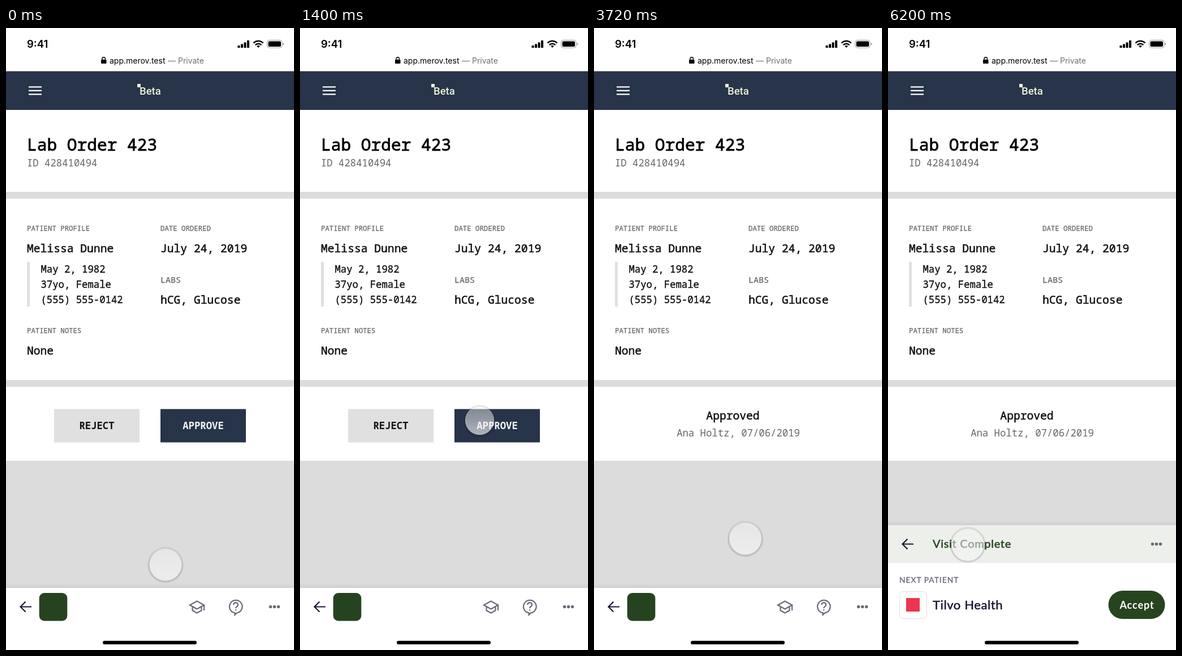
An HTML page for the animation above (6.24 s loop, 509x1101 px).

```html
<!DOCTYPE html>
<html lang="en">
<head>
<meta charset="utf-8">
<title>Lab order approval</title>
<style>
  html, body { margin: 0; width: 100%; height: 100%; overflow: hidden; background: #fff; }
  svg { display: block; width: 100vw; height: 100vh; }
  /* Thin strokes give the regular cuts a medium weight. */
  .mono { font-family: "Noto Sans Mono", "DejaVu Sans Mono", monospace; font-size: 17.3px; fill: #111; stroke: #111; stroke-width: .4; }
  .title { font-size: 29.5px; fill: #000; stroke: #000; stroke-width: .8; }
  .value { font-size: 19.65px; stroke-width: .55; }
  .label { font-size: 12.35px; fill: #666; stroke: #666; stroke-width: .25; }
  .soft { fill: #666; stroke: none; }
  .bold { font-weight: 700; stroke: none; }
  .mid { text-anchor: middle; }
  .ui { font-family: Inter, Roboto, sans-serif; font-size: 14px; }
  .app { font-family: Lato, "Open Sans", sans-serif; font-weight: 400; stroke-width: .55; }
  .line { fill: none; stroke-width: 2.2; }
</style>
</head>
<body>
<svg viewBox="0 0 509 1101" preserveAspectRatio="none">
  <defs>
    <clipPath id="view"><rect y="145" width="509" height="956"/></clipPath>
    <linearGradient id="glass" x2="0" y2="1">
      <stop stop-color="#f4f4f4" stop-opacity=".42"/>
      <stop offset="1" stop-color="#f4f4f4" stop-opacity=".66"/>
    </linearGradient>
    <linearGradient id="edge" x2="0" y2="1">
      <stop stop-opacity="0"/>
      <stop offset="1" stop-opacity=".06"/>
    </linearGradient>
    <radialGradient id="halo">
      <stop offset=".86" stop-opacity="0"/>
      <stop offset=".89" stop-opacity=".18"/>
      <stop offset="1" stop-opacity="0"/>
    </radialGradient>
  </defs>

  <rect y="145" width="509" height="956" fill="#dcdcdc"/>
  <g clip-path="url(#view)">
    <g id="page">
      <path fill="#fff" d="M0 100H509V290H0zM0 302H509V623H0zM0 635H509V766H0z"/>
      <text class="mono title" x="37" y="216.5">Lab Order 423</text>
      <text class="mono soft" x="37" y="245">ID 428410494</text>
      <text class="mono label" x="37" y="359">PATIENT PROFILE</text>
      <text class="mono value" x="37" y="397">Melissa Dunne</text>
      <rect x="37" y="414" width="5" height="79" fill="#e0e0e0"/>
      <text class="mono" x="61.5" y="433">May 2, 1982</text>
      <text class="mono" x="61.5" y="460">37yo, Female</text>
      <text class="mono" x="61.5" y="487">(555) 555-0142</text>
      <text class="mono label" x="37" y="539.5">PATIENT NOTES</text>
      <text class="mono value" x="37" y="577.5">None</text>
      <text class="mono label" x="273" y="359">DATE ORDERED</text>
      <text class="mono value" x="273" y="397">July 24, 2019</text>
      <text class="mono label" x="273" y="451" style="font-size:15px">LABS</text>
      <text class="mono value" x="273" y="488">hCG, Glucose</text>
      <g id="buttons">
        <rect x="85" y="674.5" width="151" height="59" fill="#e0e0e0"/>
        <rect x="273" y="674.5" width="151" height="59" fill="#273449"/>
        <text class="mono bold mid" x="160.5" y="710">REJECT</text>
        <text id="approve" class="mono bold mid" x="348.5" y="710" style="fill:#f4f4f4">APPROVE</text>
        <g id="spinner" transform="translate(349 704)" stroke="#fff" stroke-width="2" stroke-linecap="round"></g>
      </g>
      <g id="approved">
        <text class="mono value mid" x="245.5" y="693">Approved</text>
        <text class="mono soft mid" x="255" y="722.5">Ana Holtz, 07/06/2019</text>
      </g>
    </g>
  </g>

  <rect width="509" height="77" fill="#fff"/>
  <rect y="76.5" width="509" height="68.500" fill="#273449"/>
  <path d="M40 104.3H63M40 110.8H63M40 117.3H63" stroke="#fff" stroke-width="2.2"/>
  <rect x="232" y="99" width="6" height="6" fill="#eef0d8"/>
  <text x="236" y="118" fill="#eef0d8" style="font:500 18.5px Roboto,sans-serif">Beta</text>
  <rect id="progress" y="73.5" height="3.5" fill="#4b5942"/>

  <text class="ui" x="37" y="34.5" style="font-size:18.5px;font-weight:600">9:41</text>
  <path d="M409.5 31h4v4h-4zM415 28.5h4V35h-4zM420.5 25.5h4V35h-4zM426 22h4v13h-4z"/>
  <g fill="none" stroke="#000" stroke-width="2.5">
    <path d="M437.5 26.5a12.2 12.2 0 0 1 17 0M440.7 30a7.6 7.6 0 0 1 10.6 0"/>
    <rect x="461.5" y="21.5" width="26.5" height="13.5" rx="4" stroke="#999" stroke-width="1"/>
  </g>
  <path d="M446 35l-2.8-3a4 4 0 0 1 5.6 0z"/>
  <rect x="463.5" y="23.5" width="22.5" height="9.5" rx="2.2"/>
  <path d="M489.5 26v4.5q2-.6 2-2.2t-2-2.3z" fill="#999"/>
  <rect x="168" y="56" width="9.5" height="7" rx="1"/>
  <path d="M170 56.5v-2a2.7 2.7 0 0 1 5.4 0v2" fill="none" stroke="#000" stroke-width="1.4"/>
  <text class="ui" x="183" y="62.5">app.merov.test</text>
  <text class="ui" x="286" y="62.5" fill="#707070">— Private</text>

  <g id="sheet">
    <rect y="983" width="509" height="8" fill="url(#edge)"/>
    <rect y="991" width="509" height="230" fill="#fff"/>
    <g id="done">
      <rect id="tint" y="991" width="509" fill="#ecefea"/>
      <text class="app" x="79" y="1031" fill="#274420" stroke="#274420" style="font-size:20px;letter-spacing:.7px">Visit Complete</text>
    </g>
    <g id="tools">
      <rect x="58.7" y="1000" width="49.6" height="49.5" rx="9" fill="#26431f"/>
      <g class="line" stroke="#6b6878">
        <path d="M325 1021.5L337.5 1014.5 350 1021.5 337.5 1028.5zM329.5 1025v6l8 4.5 8-4.5v-6M350 1021.5v9.5"/>
        <path d="M404.5 1035.3a11.3 11.3 0 1 1 3.5 0l-3.5 3.5z"/>
        <path d="M402.3 1021a3.8 3.8 0 1 1 5.6 3.2q-1.8 1-1.8 3M406.1 1029v2.3"/>
      </g>
    </g>
    <path class="line" stroke="#1b1533" d="M45 1024.5H26M34.5 1015.5l-9 9 9 9"/>
    <g fill="#6b6878">
      <circle cx="467.5" cy="1024.5" r="2.7"/>
      <circle cx="474.5" cy="1024.5" r="2.7"/>
      <circle cx="481.5" cy="1024.5" r="2.7"/>
    </g>
    <g id="next">
      <text class="app" x="20" y="1093" fill="#6a6678" stroke="#6a6678" style="font-size:13.8px;letter-spacing:1px;stroke-width:.3">NEXT PATIENT</text>
      <rect x="20.5" y="1108.5" width="48" height="48" rx="7" fill="#fff" stroke="#dedede"/>
      <rect x="32" y="1120" width="24" height="24" fill="#ee3550"/>
      <text class="app" x="79" y="1139.5" fill="#1b1533" stroke="#1b1533" style="font-size:22px;letter-spacing:.6px">Tilvo Health</text>
      <rect x="389.5" y="1107" width="100" height="50" rx="25" fill="#26451f"/>
      <text class="app mid" x="440" y="1138.5" fill="#fff" style="font-size:18px;font-weight:700;letter-spacing:.9px">Accept</text>
    </g>
  </g>
  <rect x="171" y="1084.8" width="166" height="6.2" rx="3.1"/>

  <g id="cursor">
    <circle cy="1.5" r="32.5" fill="url(#halo)"/>
    <circle r="28.2" fill="url(#glass)" stroke="#fff" stroke-opacity=".3"/>
  </g>
</svg>
<script>
const LOOP = 6240;
const el = id => document.getElementById(id);
const ease = p => p < .5 ? 2 * p * p : 1 - 2 * (1 - p) ** 2;

// Eased interpolation between [time, value] keys.
function track(t, ...keys) {
  if (t <= keys[0][0]) return keys[0][1];
  for (let i = 1; i < keys.length; i++) {
    const [t0, a] = keys[i - 1], [t1, b] = keys[i];
    if (t < t1) return a + (b - a) * ease((t - t0) / (t1 - t0));
  }
  return keys[keys.length - 1][1];
}

const set = (id, name, value) => el(id).setAttribute(name, value);
const fade = (id, value) => set(id, "opacity", value);

const spokes = Array.from({ length: 12 }, (_, i) => {
  const spoke = document.createElementNS("http://www.w3.org/2000/svg", "path");
  spoke.setAttribute("d", "M0 -8V-13");
  spoke.setAttribute("transform", `rotate(${i * 30})`);
  el("spinner").append(spoke);
  return spoke;
});

function draw(t) {
  const scroll = track(t, [320, 0], [720, 48], [760, 48], [1160, 0]);
  set("page", "transform", `translate(0 ${-scroll})`);

  const loading = track(t, [1460, 0], [1580, 1]);
  fade("approve", 1 - loading);
  fade("spinner", loading);
  const head = Math.floor(t / 83);
  spokes.forEach((spoke, i) => spoke.setAttribute("opacity", 1 - ((head - i + 1200) % 12) * .065));

  set("progress", "width", track(t, [1600, 0], [3160, 509]));
  fade("progress", track(t, [3200, 1], [3360, 0]));
  const approved = track(t, [3200, 0], [3360, 1]);
  fade("buttons", 1 - approved);
  fade("approved", approved);

  const done = track(t, [3760, 0], [4040, 1]);
  const lift = track(t, [4160, 0], [4640, 111]);
  fade("done", done);
  fade("tools", 1 - done);
  fade("next", lift > 0 ? 1 : 0);
  set("tint", "height", lift > 0 ? 67 : 110);
  set("sheet", "transform", `translate(0 ${-lift})`);

  const x = track(t, [0, 282], [480, 279.5], [980, 279.5], [1320, 317.5], [1760, 317.5], [2240, 267.5], [5480, 267.5], [6040, 141]);
  const y = track(t, [0, 949], [480, 813], [980, 813], [1320, 694.5], [1760, 694.5], [2240, 903], [5480, 903], [6040, 913.5]);
  const size = track(t, [1300, 1], [1390, .9], [1430, .9], [1540, 1]);
  set("cursor", "transform", `translate(${x} ${y}) scale(${size})`);
}

const start = performance.now();
function tick() {
  draw((performance.now() - start) % LOOP);
  requestAnimationFrame(tick);
}
tick();
</script>
</body>
</html>
```
